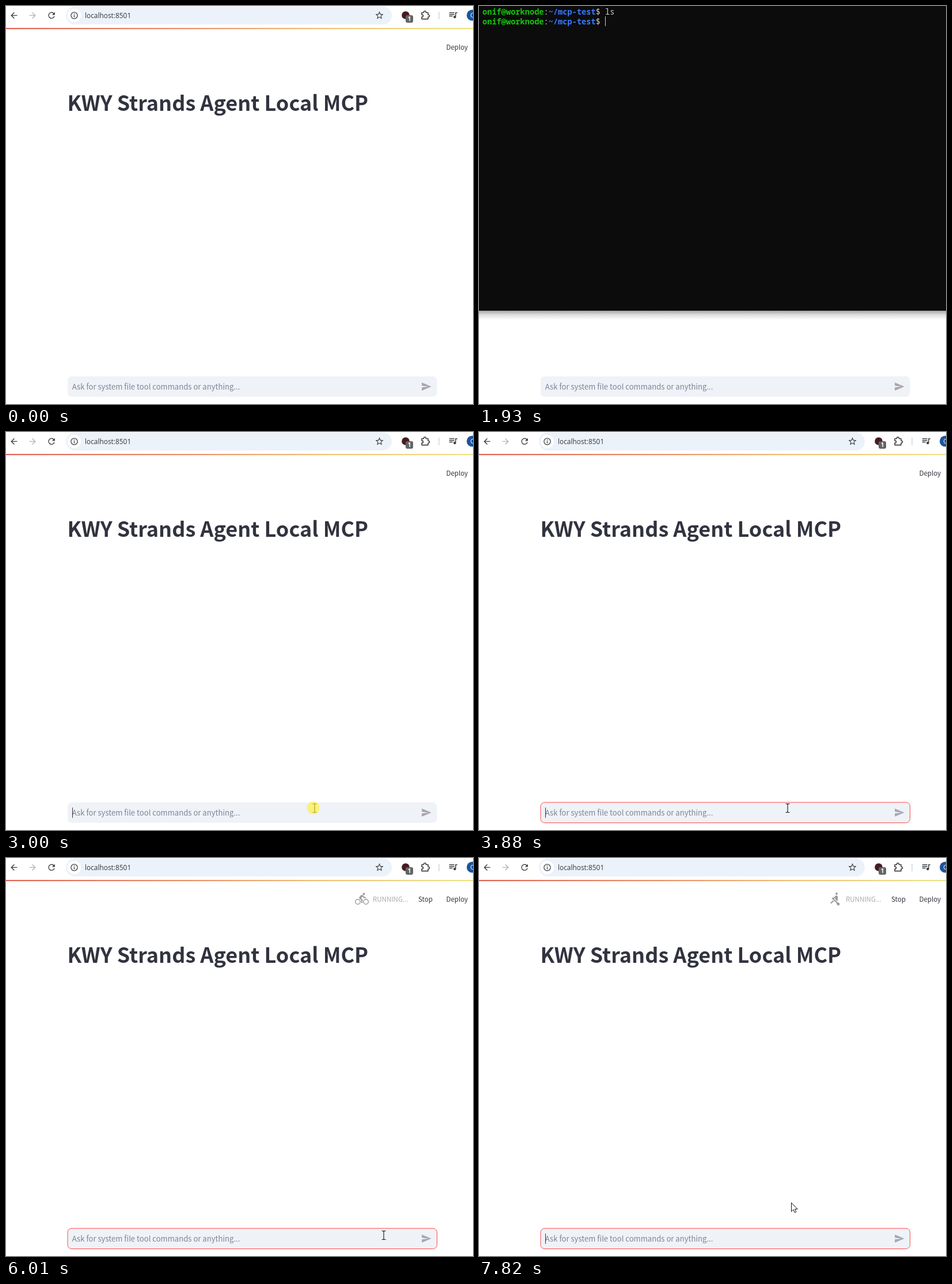
An HTML page that plays this animation: 811 px wide and 691 px high, repeating every 8000 ms.

```html
<!DOCTYPE html>
<html lang="en">
<head>
<meta charset="utf-8">
<title>Local agent demo</title>
<style>
html, body { margin: 0; width: 100%; height: 100%; overflow: hidden; background: #fff; }
svg { display: block; width: 811px; height: 691px; }
.ui { font-family: "Noto Sans CJK JP", "Noto Sans CJK SC", "Noto Sans", sans-serif; }
.bar { font-family: "Open Sans", "Noto Sans", sans-serif; }
.term { font-family: "Noto Sans Mono", "DejaVu Sans Mono", monospace; font-size: 13.67px; white-space: pre; }
.b { font-weight: 700; }
</style>
</head>
<body>
<svg id="stage" viewBox="0 0 811 691" xmlns="http://www.w3.org/2000/svg">
  <defs>
    <linearGradient id="rainbow">
      <stop offset="0" stop-color="#df6357"/>
      <stop offset=".4" stop-color="#e99268"/>
      <stop offset=".7" stop-color="#f0c478"/>
      <stop offset="1" stop-color="#f0e285"/>
    </linearGradient>
    <linearGradient id="shade" x2="0" y2="1">
      <stop offset="0" stop-color="#000" stop-opacity=".36"/>
      <stop offset=".45" stop-color="#000" stop-opacity=".13"/>
      <stop offset="1" stop-color="#000" stop-opacity="0"/>
    </linearGradient>
  </defs>
  <rect width="811" height="691" fill="#fff"/>

  <g id="browser">
    <rect x="104" y="1" width="566" height="31" rx="15.5" fill="#ecf2fa"/>
    <circle cx="118.500" cy="16.500" r="11.500" fill="#fff"/>
    <circle cx="118.500" cy="16.500" r="5.600" fill="none" stroke="#3c4043" stroke-width="1.300"/>
    <path d="M118.500 15.800v3.700M118.500 13v1.500" stroke="#3c4043" stroke-width="1.400"/>
    <text class="bar" x="137" y="21" font-size="11.900" fill="#32363b">localhost:8501</text>
    <circle cx="694" cy="16" r="6.800" fill="#471c20"/>
    <rect x="694" y="16" width="13" height="13" rx="3" fill="#626466"/>
    <text class="bar b" x="700.500" y="26.400" font-size="10" fill="#fff" text-anchor="middle">1</text>
    <path d="M722 11.500h3.500v-.8a1.900 1.900 0 0 1 3.800 0v.8h3.700v3.700h.6a1.900 1.900 0 0 1 0 3.800h-.6v3.600h-11v-3.500h.5a2 2 0 0 0 0-4h-.5z" fill="none" stroke="#3c4043" stroke-width="1.600" stroke-linejoin="round"/>
    <path d="M752 10v13" stroke="#c8d8ea" stroke-width="1.500"/>
    <circle cx="809.500" cy="16" r="9.500" fill="#1d559c"/>
    <text class="bar" x="810.500" y="20" font-size="11" fill="#fff" text-anchor="middle">O</text>
    <rect y="38" width="811" height="2.200" fill="url(#rainbow)"/>
    <text class="ui" x="764.500" y="76" font-size="11.500" fill="#31333f">Deploy</text>
    <text class="ui b" x="106.500" y="182" font-size="36" fill="#31333f">KWY Strands Agent Local MCP</text>
    <g id="status">
      <g id="sport"></g>
      <text class="ui" x="637" y="76" font-size="11.500" fill="#a9aab0">RUNNING...</text>
      <text class="ui" x="716" y="76" font-size="11.500" fill="#31333f">Stop</text>
    </g>
  </g>

  <g id="input">
    <rect id="box" x="107" y="643" width="641.500" height="35.500" rx="7" fill="#eff2f7"/>
    <text class="ui" x="114.800" y="666" font-size="13.100" fill="#808495">Ask for system file tool commands or anything...</text>
    <path id="caret" d="M115.500 652v18" stroke="#31333f"/>
  </g>

  <g id="terminal">
    <rect y="529" width="811" height="16" fill="url(#shade)"/>
    <rect width="811" height="529" fill="#0c0c0c"/>
    <g id="lines" class="term"></g>
    <path id="bar" stroke="#ccc"/>
  </g>

  <g id="mouse">
    <path id="beam" d="M-3.500-7.500h2.500l1 1 1-1h2.500M-3.500 7.500h2.500l1-1 1 1h2.500M0-6.500v13" fill="none" stroke="#111" stroke-width="1.100"/>
    <path id="arrow" d="M.5.5v15.300l3.500-3.300 2.300 5.200 2.500-1.100-2.300-5h4.700z" fill="#fff" stroke="#111"/>
    <circle id="halo" cx="-2.500" cy="-.5" r="11" fill="#fff03a" opacity=".65"/>
  </g>
</svg>
<script>
const LOOP = 8000, BLINK = 530, STEP = 200.5;
const $ = id => document.getElementById(id);
const show = (id, on) => $(id).setAttribute('visibility', on ? 'inherit' : 'hidden');
const icon = (d, x, y, s, fill) =>
  `<path d="${d}" transform="translate(${x} ${y}) scale(${s})" fill="${fill}"/>`;
const between = (t, a, b) => t >= a && t < b;

const BACK = 'M20 11H7.830l5.590-5.590L12 4l-8 8 8 8 1.410-1.410L7.830 13H20z';
const RELOAD = 'M17.650 6.350C16.200 4.900 14.210 4 12 4a8 8 0 0 0 0 16c3.730 0 6.840-2.550 7.730-6h-2.080A6 6 0 1 1 12 6c1.660 0 3.140.69 4.220 1.780L13 11h7V4z';
const STAR = 'M22 9.240l-7.190-.62L12 2 9.190 8.630 2 9.240l5.460 4.730L5.820 21 12 17.270 18.180 21l-1.630-7.030zM12 15.400l-3.760 2.270 1-4.280-3.320-2.880 4.380-.38L12 6.100l1.710 4.040 4.380.38-3.320 2.880 1 4.280z';
const QUEUE = 'M15 6H3v2h12zm0 4H3v2h12zM3 16h8v-2H3zM17 6v8.180A3 3 0 1 0 19 17V8h3V6z';
const SEND = 'M2 21L23 12 2 3v7l15 2-15 2z';

const dot = (x, y) => `M${x - 2} ${y}a2 2 0 1 0 4 0a2 2 0 1 0-4 0z`;
const wheel = x => `M${x} 12a5 5 0 1 0 0 10a5 5 0 1 0 0-10zm0 8.500a3.500 3.500 0 1 1 0-7a3.500 3.500 0 1 1 0 7z`;
const wave = y => `M2 ${y}q1.700 0 3.300-1t3.400 0 3.300 0 3.300 0 3.400 0 3.300 1v2q-1.700 0-3.300-1t-3.400 0-3.300 0-3.300 0-3.400 0-3.300 1z`;
const SPORTS = [
  // bike
  dot(15.5, 3.5) + wheel(5) + wheel(19) + 'M10.800 10.500l2.400-2.400.8.8c1.300 1.300 3 2.100 5.100 2.100V9c-1.500 0-2.700-.6-3.600-1.500l-1.900-1.900c-.5-.4-1-.6-1.600-.6s-1.100.2-1.400.6L7.800 8.400c-.4.4-.6.9-.6 1.400 0 .6.2 1.100.6 1.400L11 14v5h2v-6.200z',
  // walk
  dot(13.5, 3.5) + 'M9.800 8.900L7 23h2.100l1.800-8 2.100 2v6h2v-7.500l-2.100-2 .6-3C14.800 12 16.800 13 19 13v-2c-1.900 0-3.500-1-4.300-2.400l-1-1.600c-.4-.6-1-1-1.700-1-.3 0-.5.1-.8.1L6 8.300V13h2V9.600z',
  // swim
  dot(16.5, 6) + wave(15) + wave(19.5) + 'M10 8l-3.250 3.250L6 13q2 1.500 4 .5t4 .5l3-.5-6.200-6.100c-1.500-1.500-2.500-2-4.300-2.100V7.800c1.400.1 2 .4 3.500.2z',
  // row
  dot(15, 3) + 'M8.500 14.500L4 19l1.500 1.500L9 17h2zM21 21L18 24l-3-3v-1.500l-7.100-7.100-.9.100v-2.200c1.660 0 3.610-.87 4.670-2l1.400-1.550C13.400 6.340 14 6 14.700 6 16 6 17 7 17 8.260V14c0 .84-.35 1.600-.92 2.160l-3.580-3.580v-2.270c-.63.52-1.430 1-2.290 1.400L16.500 18H18z',
  // run
  dot(13.5, 3.5) + 'M9.890 19.400l1-4.400 2.100 2v5h2v-6.500l-2.100-2 .6-3c1.300 1.500 3.300 2.500 5.500 2.500v-2c-1.900 0-3.500-1-4.300-2.400l-1-1.600c-.4-.6-1-1-1.700-1-.3 0-.5.1-.8.1L6 8.300V13h2V9.600l1.800-.7-1.600 8.100-4.900-1-.4 2z',
  // wheelchair
  dot(18, 4.5) + 'M15 17h-2a3 3 0 1 1-3-3v-2a5 5 0 1 0 5 5zM18 13.500h-1.860l1.670-3.670C18.420 8.500 17.440 7 15.960 7h-5.200c-.8 0-1.540.47-1.870 1.200L8.220 10l1.920.53L10.790 9H12l-1.830 4.100C9.600 14.430 10.560 16 12 16h6v5h2v-5.500c0-1.100-.9-2-2-2z'
];

$('browser').insertAdjacentHTML('beforeend',
  icon(BACK, 5.5, 8, .7, '#3c4043') +
  icon(BACK, 54.5, 8, '-.7 .7', '#b2b4b8') +
  icon(RELOAD, 70.5, 7.7, .72, '#3c4043') +
  icon(STAR, 640, 7.7, .71, '#3c4043') +
  icon(QUEUE, 767.5, 6.5, .74, '#3c4043'));
$('input').insertAdjacentHTML('beforeend',
  `<g id="send">${icon(SEND, 720.6, 651.4, .78, 'currentColor')}</g>`);

const prompt = (y, tail) => `<text x="6" y="${y}" fill="#ccc"><tspan class="b" fill="#16c60c">onif@worknode</tspan>:` +
  `<tspan class="b" fill="#3b78ff">~/mcp-test</tspan>$ ${tail}</text>`;

let last = '';
function terminal(t) {
  const typed = 'ls'.slice(0, t < 1660 ? 0 : t < 1730 ? 1 : 2);
  const next = t >= 1930;
  const html = prompt(15, typed) + (next ? prompt(32, '') : '');
  if (html !== last) $('lines').innerHTML = last = html;
  const x = 219.5 + (next ? 0 : typed.length * 8.2), y = next ? 18 : 1;
  $('bar').setAttribute('d', `M${x} ${y}v17`);
  show('bar', between(t, 800, 1330) || between(t, 1660, 2530));
}

// time, x, y
const PATH = [
  [2530, 555, 440], [2860, 536, 653], [4410, 536, 653], [4740, 653, 664],
  [4950, 653, 664], [5210, 656, 655], [6210, 656, 655], [6620, 542, 598]
];
function mousePos(t) {
  const i = PATH.findIndex(p => p[0] > t);
  if (i < 0) return PATH[PATH.length - 1].slice(1);
  if (!i) return PATH[0].slice(1);
  const [a, b] = [PATH[i - 1], PATH[i]];
  const k = (t - a[0]) / (b[0] - a[0]), e = k * k * (3 - 2 * k);
  return [1, 2].map(j => Math.round(a[j] + (b[j] - a[j]) * e));
}

function caretOn(t) {
  if (t < 4950) return between(t, 3000, 3350) || t >= 3880;
  return Math.floor((t - 4950) / BLINK) % 2 === 1;
}

function draw(t) {
  const term = between(t, 720, 3000);
  show('terminal', term);
  show('browser', !term);
  if (term) terminal(t);

  $('box').setAttribute('stroke', t >= 3070 ? '#ff4b4b' : 'none');
  $('send').setAttribute('color', t < 3350 ? '#aaa3aa' : '#a3a8b4');
  show('caret', caretOn(t));

  const running = t >= 4410;
  show('status', running);
  if (running) {
    const n = (Math.floor((t - 4405) / STEP) + 4) % SPORTS.length;
    $('sport').innerHTML = icon(SPORTS[n], 606, 59, 1, '#9c9da2');
  }

  const [x, y] = mousePos(t);
  const inBox = y > 643;
  show('mouse', t >= 2530);
  $('mouse').setAttribute('transform', `translate(${x} ${y})`);
  show('halo', between(t, 3000, 3150));
  show('beam', inBox);
  show('arrow', !inBox);
}

const start = performance.now();
(function tick() {
  draw((performance.now() - start) % LOOP);
  requestAnimationFrame(tick);
})();
</script>
</body>
</html>
```
